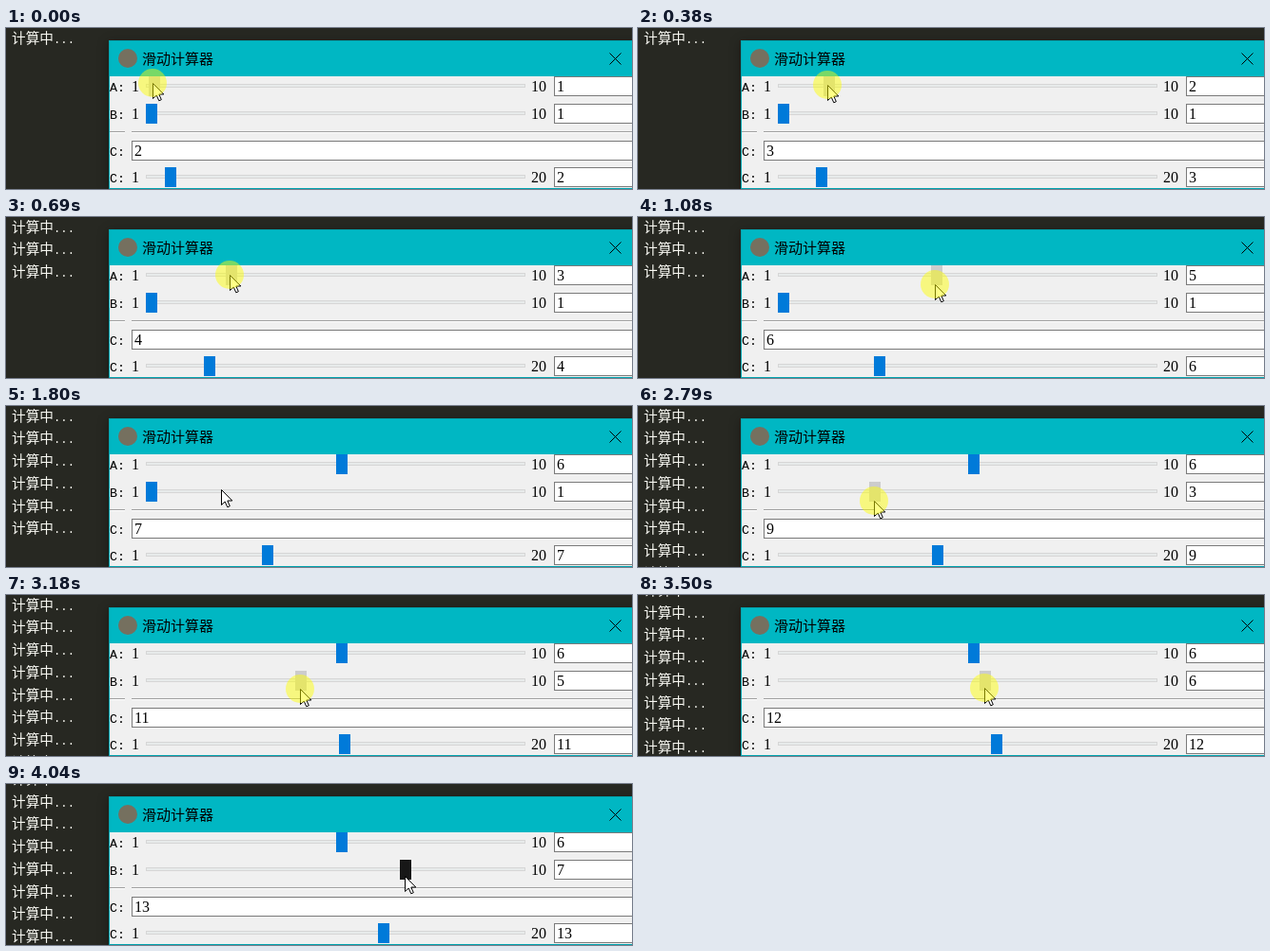
Animation, 658 px wide and 170 px high, one loop 4.27 s. Source, as an HTML page:

```html
<!DOCTYPE html>
<html lang="zh">
<head>
<meta charset="utf-8">
<title>滑动计算器</title>
<style>
  html, body { margin: 0; width: 100%; height: 100%; overflow: hidden; background: #272822; }
  svg { display: block; width: 658px; height: 170px; }
  text { white-space: pre; }
  .cjk { font: 14.67px "Noto Sans CJK SC", "Noto Sans CJK", sans-serif; fill: #f8f8f2; }
  .dots { font: 12.2px "Liberation Mono", monospace; fill: #f8f8f2; }
  .title { font: 15px "Noto Sans CJK SC", "Noto Sans CJK", sans-serif; }
  .label { font: 13.33px "Liberation Mono", monospace; }
  .num { font: 16px "Liberation Serif", serif; }
  .trough { fill: #e7eaea; stroke: #d6d6d6; }
  .entry { fill: #fff; stroke: #7a7a7a; }
  .window { fill: #00a3ae; filter: drop-shadow(0 2px 6px rgba(0, 0, 0, .35)); }
</style>
</head>
<body>
<svg viewBox="0 0 658 170">
  <rect width="658" height="170" fill="#272822"/>
  <g id="log"></g>
  <rect class="window" x="108" y="13" width="570" height="157"/>
  <rect x="109" y="14" width="549" height="37" fill="#00b7c3"/>
  <rect x="109" y="51" width="549" height="118" fill="#f0f0f0"/>
  <circle cx="128" cy="32" r="10" fill="#75705f"/>
  <text class="title" x="143" y="37.5">滑动计算器</text>
  <path d="M634.5 26.5l12 12m0-12l-12 12" stroke="#000"/>
  <path d="M109 109.5h16m7 0h526" stroke="#a0a0a0"/>
  <path d="M109 110.5h16m7 0h526" stroke="#fff"/>
  <g id="form"></g>
  <g id="pointer">
    <path d="M.5 .5V16.5L4.2 13L6.8 18.8L9.3 17.7L6.8 12H11.8Z" fill="#fff" stroke="#000"/>
    <circle id="press" r="15" fill="#ff0" fill-opacity=".47"/>
  </g>
</svg>
<script>
const LOOP = 4270, STEP = 77.7, LEAD = 10;   // the screen refreshes once per STEP
const LEFT = 147, TRAVEL = 387;
const BLUE = '#007ad9', HOVER = '#171717', HELD = '#cccccc';
const ROWS = 8, ROW = 23.75, FLUSH = 9;      // the console catches up every FLUSH refreshes

// refreshes at which the mouse button changes
const RELEASE_A = 20, REACH_B = 28, PRESS_B = 29, RELEASE_B = 52;

// pointer path: refresh, x, y
const path = [[0, 154, 58], [9, 235, 61], [14, 312, 71], [17, 351, 75], [21, 351, 75],
  [23, 226, 88], [25, 160, 109], [REACH_B, 152, 100], [PRESS_B, 152, 100],
  [32, 200, 100], [41, 309, 99], [49, 419, 97]];

const $ = id => document.getElementById(id);

function add(parent, tag, attrs, content = '') {
  const el = document.createElementNS('http://www.w3.org/2000/svg', tag);
  for (const k in attrs) el.setAttribute(k, attrs[k]);
  el.textContent = content;
  parent.append(el);
  return el;
}

const lines = Array.from({ length: ROWS }, (_, i) => {
  const g = add($('log'), 'g', { transform: `translate(6 ${15.5 + ROW * i})` });
  add(g, 'text', { class: 'cjk' }, '计算中');
  add(g, 'text', { class: 'dots', x: 44 }, '...');
  return g;
});

function entry(x, y) {
  add($('form'), 'rect', { class: 'entry', x: x + .5, y: y + .5, width: 560, height: 20 });
  return add($('form'), 'text', { class: 'num', x: x + 3, y: y + 16 });
}

function label(name, y) {
  add($('form'), 'text', { class: 'label', x: 109, y: y + 15.5 }, name + ':');
}

function slider(name, y, max) {
  const form = $('form');
  label(name, y);
  add(form, 'text', { class: 'num', x: 132, y: y + 16 }, '1');
  add(form, 'rect', { class: 'trough', x: LEFT + .5, y: y + 8.5, width: 398, height: 3 });
  add(form, 'text', { class: 'num', x: 552, y: y + 16 }, max);
  const knob = add(form, 'rect', { y, width: 12, height: 21 });
  const value = entry(576, y);
  return (x, number, fill = BLUE) => {
    knob.setAttribute('x', Math.floor(x));
    knob.setAttribute('fill', fill);
    value.textContent = number;
  };
}

const setA = slider('A', 51, 10), setB = slider('B', 80, 10);
label('C', 119);
const sum = entry(132, 119);
const setC = slider('C', 147, 20);

function pointerAt(k) {
  const next = path.findIndex(p => p[0] > k);
  if (next < 0) return path[path.length - 1].slice(1);
  const [k0, x0, y0] = path[next - 1], [k1, x1, y1] = path[next];
  const f = (k - k0) / (k1 - k0);
  return [x0 + (x1 - x0) * f, y0 + (y1 - y0) * f].map(Math.round);
}

const valueAt = x => Math.round(1 + 9 * (x - LEFT) / TRAVEL);

function stateAt(k) {
  const ax = pointerAt(Math.min(k, RELEASE_A))[0] - 4;
  const bx = pointerAt(k)[0] - 5;
  const knobB = k < PRESS_B ? LEFT : bx;
  const a = valueAt(ax), b = valueAt(knobB);
  return { ax, bx: knobB, a, b, total: a + b };
}

function draw(k) {
  const [x, y] = pointerAt(k);
  const holdA = k < RELEASE_A, holdB = k >= PRESS_B && k < RELEASE_B;
  const s = stateAt(k);

  setA(s.ax, s.a, holdA ? HELD : BLUE);
  setB(s.bx, s.b, holdB ? HELD : k >= REACH_B ? HOVER : BLUE);
  setC(LEFT + TRAVEL * (s.total - 1) / 19, s.total);
  sum.textContent = s.total;

  // one line is printed for every change of the total
  const flushed = Math.max(0, Math.floor((k + 1) / FLUSH) * FLUSH - 1);
  const count = stateAt(flushed).total - 1;
  lines.forEach((g, i) => g.setAttribute('visibility', i < count ? 'visible' : 'hidden'));
  $('log').setAttribute('transform', `translate(0 ${count > ROWS ? 8 - ROW : 0})`);

  $('pointer').setAttribute('transform', `translate(${x} ${y})`);
  $('press').setAttribute('visibility', holdA || holdB ? 'visible' : 'hidden');
}

const start = performance.now();
function frame() {
  const t = (performance.now() - start) % LOOP;
  draw(Math.floor((t + LEAD) / STEP));
  requestAnimationFrame(frame);
}
frame();
</script>
</body>
</html>
```
